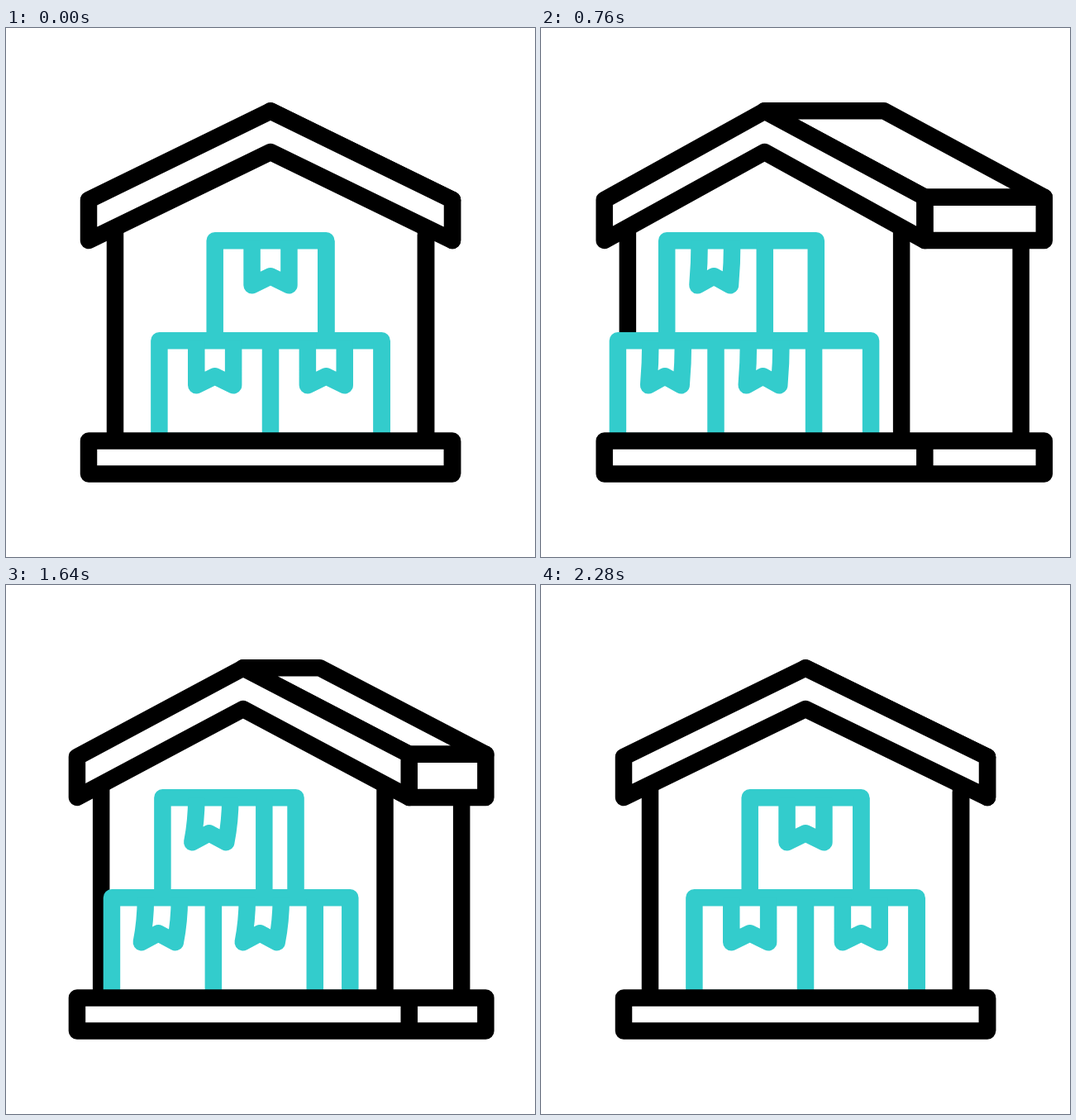
Write an HTML page with a canvas that moves like this. It is 640 px wide and 640 px high and loops after 2440 ms.

```html
<!DOCTYPE html>
<html lang="en">
<head>
<meta charset="utf-8">
<title>Warehouse</title>
<style>
html, body { margin: 0; width: 100%; height: 100%; overflow: hidden; background: #fff; }
canvas { display: block; width: 640px; height: 640px; }
</style>
</head>
<body>
<canvas id="stage" width="640" height="640"></canvas>
<script>
const ctx = document.getElementById('stage').getContext('2d');
const LOOP = 2440, STEP = 40, TURN_BACK = 1400;
const BLACK = '#000', TEAL = '#33cccc';

// [time, sideways swing of the tape ends]
const SWING = [[0, 0], [360, 6.4], [760, -2.3], [1080, 1.2], [1340, 0],
  [1680, -5.3], [2080, 2.3], [2280, 0], [LOOP, 0]];

const smooth = u => {
  u = Math.max(0, Math.min(1, u));
  return u * u * (3 - 2 * u);
};

// Rises to 1, holds, then returns to 0.
const turn = (t, rise, power, fall) => t < TURN_BACK
  ? smooth((t / rise) ** power)
  : 1 - smooth((t - TURN_BACK) / fall);

function swingAt(t) {
  const i = SWING.findIndex(key => key[0] > t);
  const [t0, a] = SWING[i - 1], [t1, b] = SWING[i];
  return a + (b - a) * smooth((t - t0) / (t1 - t0));
}

function shape(points, color, closed = true) {
  ctx.beginPath();
  points.forEach(([x, y]) => ctx.lineTo(x, y));
  if (closed) {
    ctx.closePath();
    ctx.fill();
  }
  ctx.strokeStyle = color;
  ctx.stroke();
}

const box = (x0, y0, x1, y1, color) =>
  shape([[x0, y0], [x1, y0], [x1, y1], [x0, y1]], color);

const post = (x, y0, y1, color) => shape([[x, y0], [x, y1]], color, false);

function tape(x, y, half, swing) {
  const l = x - half, r = x + half;
  ctx.beginPath();
  ctx.moveTo(l, y);
  ctx.quadraticCurveTo(l, y + 28, l + swing, y + 54);
  ctx.lineTo(x + swing, y + 43);
  ctx.lineTo(r + swing, y + 54);
  ctx.quadraticCurveTo(r, y + 28, r, y);
  ctx.strokeStyle = TEAL;
  ctx.stroke();
}

function drawBoxes(t, scale) {
  const x = 320 - 108.5 * turn(t, 696, 0.776, 589);
  const depth = turn(t, 736, 0.85, 569);
  const half = 67.3 * scale;
  const swing = swingAt(t);

  box(x - half, 257.3, x + half + 62 * depth, 378.3, TEAL);
  post(x + half, 257.3, 378.3, TEAL);
  tape(x, 257.3, half / 3, swing);

  box(x - 2 * half, 378.3, x + 2 * half + 69 * depth, 500, TEAL);
  post(x, 378.3, 500, TEAL);
  post(x + 2 * half, 378.3, 500, TEAL);
  tape(x - half, 378.3, half / 3, swing);
  tape(x + half, 378.3, half / 3, swing);
}

function draw(t) {
  const x = 320 - 49.5 * turn(t, 724, 0.86, 624);
  const scale = 1 - 0.119 * turn(t, 750, 0.97, 703);
  const side = turn(t, 680, 1, 593);
  const depth = 144.5 * side;
  const left = x - 220 * scale, right = x + 220 * scale, far = right + depth;
  const wall = 188 * scale;
  const eave = 208 - 3.2 * Math.min(1, 5 * side);

  ctx.fillStyle = '#fff';
  ctx.fillRect(0, 0, 640, 640);
  ctx.lineWidth = 20.5;
  ctx.lineJoin = 'round';
  ctx.lineCap = 'butt';

  post(x - wall, 242, 500, BLACK);
  post(x + wall, 242, 500, BLACK);
  post(x + wall + depth, 250, 500, BLACK);
  drawBoxes(t, scale);

  // Roof
  shape([[x, 100.2], [x + depth, 100.2], [far, eave], [right, eave]], BLACK);
  box(right, eave, far, 257, BLACK);
  shape([[left, 208], [x, 100.5], [right, eave], [right, 257],
    [x, 150], [left, 257]], BLACK);

  // Floor
  box(left, 499.5, far, 539.5, BLACK);
  post(right, 499.5, 539.5, BLACK);
}

function frame(now) {
  draw(Math.floor(now % LOOP / STEP) * STEP);
  requestAnimationFrame(frame);
}
draw(0);
requestAnimationFrame(frame);
</script>
</body>
</html>
```
